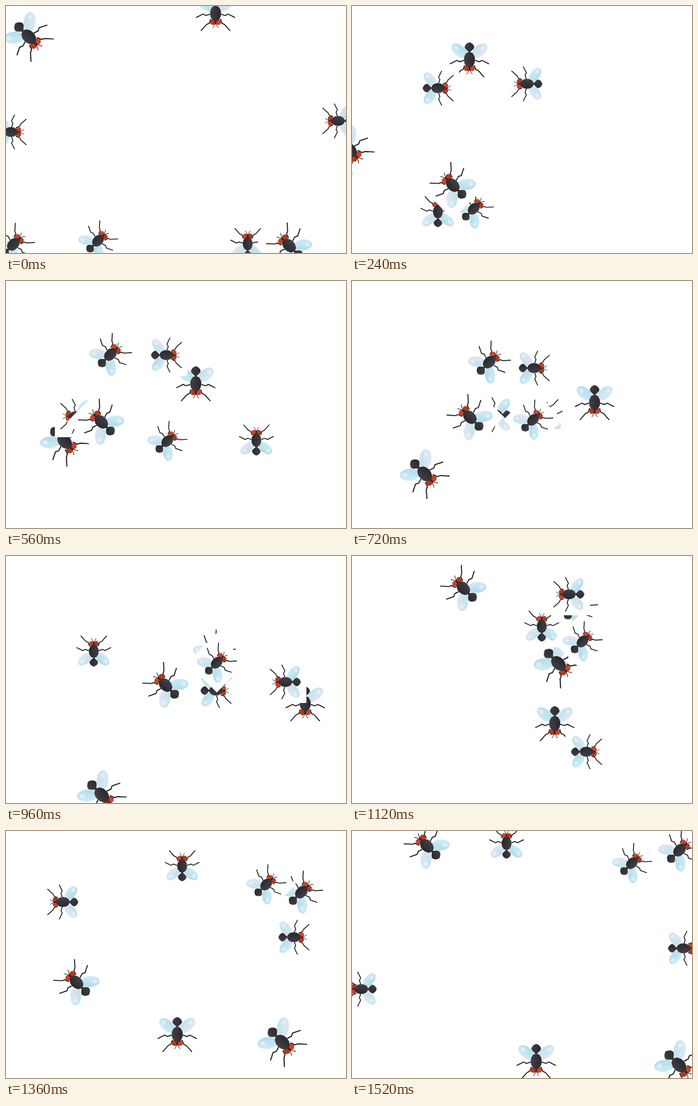
An HTML page with a canvas that plays this animation: 550 by 400 pixels, repeating every 1600 ms.

```html
<!DOCTYPE html>
<html lang="en">
<head>
<meta charset="utf-8">
<title>Flies</title>
<style>
  html, body { margin: 0; width: 550px; height: 400px; overflow: hidden; background: #fff; }
  canvas { display: block; }
</style>
</head>
<body>
<canvas id="stage" width="550" height="400"></canvas>
<script>
const ctx = document.getElementById('stage').getContext('2d');
const STEP = 80, STEPS = 20, LAST = STEPS - 1;
const TURNS = [0, 3, 7, 12, 14, 17, LAST];

// Steady travel from a to b; a surge hurries the first half and slows the second.
const glide = (a, b, surge = 0) => step => {
  const u = step / LAST;
  return a + (b - a) * u + surge * (Math.sin(2 * Math.PI * u) + 0.75 * Math.sin(Math.PI * u));
};

// Smooth wandering through one value per turn, without overshoot.
const wander = (...v) => {
  const slope = i => (v[i + 1] - v[i]) / (TURNS[i + 1] - TURNS[i]);
  const tangent = i => {
    if (i === 0) return slope(0);
    if (i === v.length - 1) return slope(i - 1);
    const a = slope(i - 1), b = slope(i);
    return a * b > 0 ? 2 * a * b / (a + b) : 0;
  };
  return step => {
    const i = Math.max(0, TURNS.findIndex(turn => step <= turn) - 1);
    const span = TURNS[i + 1] - TURNS[i], u = (step - TURNS[i]) / span, w = 1 - u;
    return w * w * ((1 + 2 * u) * v[i] + u * span * tangent(i)) +
           u * u * ((3 - 2 * u) * v[i + 1] - w * span * tangent(i + 1));
  };
};

// Back to front.
const flies = [
  { angle: 180, size: 1.13, x: wander(339, 190, 307, 484, 328, 277, 298), y: glide(12, 373, 15) },
  { angle: 45, size: 1.07, x: wander(12, 160, 169, 337, 363, 478, 530), y: wander(386, 296, 119, 154, 82, 99, 31) },
  { angle: 135, size: 1.24, x: wander(37, -4, 95, 155, 334, 447, 529), y: wander(50, 233, 260, 387, 174, 342, 379) },
  { angle: 90, size: 1, x: glide(8, 536, 40), y: wander(204, 133, 120, 218, 317, 172, 190) },
  { angle: 0, size: 1, x: wander(391, 139, 405, 142, 307, 285, 250), y: glide(385, 20, 5) },
  { angle: -90, size: 1, x: wander(537, 283, 113, 452, 351, 92, 15), y: wander(186, 126, 219, 204, 62, 115, 256) },
  { angle: 45, size: 1, x: glide(149, 453), y: glide(380, 52) },
  { angle: -45, size: 1.15, x: wander(458, 163, 154, 258, 180, 114, 121), y: wander(388, 290, 228, 209, 52, 245, 24) }
];

function ellipse(x, y, rx, ry, fill, turn = 0) {
  ctx.beginPath();
  ctx.ellipse(x, y, rx, ry, turn, 0, Math.PI * 2);
  ctx.fillStyle = fill;
  ctx.fill();
}

function blend(x0, y0, x1, y1, from, to) {
  const g = ctx.createLinearGradient(x0, y0, x1, y1);
  g.addColorStop(0, from);
  g.addColorStop(1, to);
  return g;
}

const blueWing = blend(9, 19, 20, 7, '#b3dcea', '#cfecf5');
const paleWing = blend(9, 19, 20, 7, '#bfe3ee', '#e2e6f3');
const bodyFill = blend(-8, 0, 8, 0, '#29282c', '#424046');
const legs = new Path2D('M21-25L13-16L9-14L7-8M28-6L18-1L14-3L8-1');
const antenna = new Path2D('M1-15L2-18L4-21');
const tail = new Path2D('M0 9C2 13 6 14 7 18Q6 23 0 25Q-6 23-7 18C-6 14-2 13 0 9Z');

function drawSide(wing, eye) {
  ellipse(14.5, 13, 13, 7.8, wing, 0.7);
  ellipse(19, 17, 3.5, 3, 'rgba(240,242,250,.6)', 0.7);
  ctx.strokeStyle = '#1a191b';
  ctx.lineWidth = 1.4;
  ctx.stroke(legs);
  ctx.lineWidth = 0.8;
  ctx.stroke(antenna);
  ellipse(3.9, -12.3, 4.1, 4.2, eye);
}

function drawFly({ angle, size, x, y }, step) {
  ctx.save();
  ctx.translate(x(step), y(step));
  ctx.rotate(angle * Math.PI / 180);
  ctx.scale(size, size);
  ctx.fillStyle = '#fff';
  ctx.fillRect(-34, -34, 68, 68);
  drawSide(blueWing, '#b23a20');
  ctx.save();
  ctx.scale(-1, 1);
  drawSide(paleWing, '#c9432a');
  ctx.restore();
  ctx.fillStyle = bodyFill;
  ctx.fill(tail);
  ellipse(0, -12, 1.3, 4, '#3a2422');
  ellipse(0, 0, 8, 11, bodyFill);
  ctx.restore();
}

function draw() {
  const step = Math.floor(performance.now() / STEP) % STEPS;
  ctx.fillStyle = '#fff';
  ctx.fillRect(0, 0, 550, 400);
  flies.forEach(fly => drawFly(fly, step));
  requestAnimationFrame(draw);
}
draw();
</script>
</body>
</html>
```
